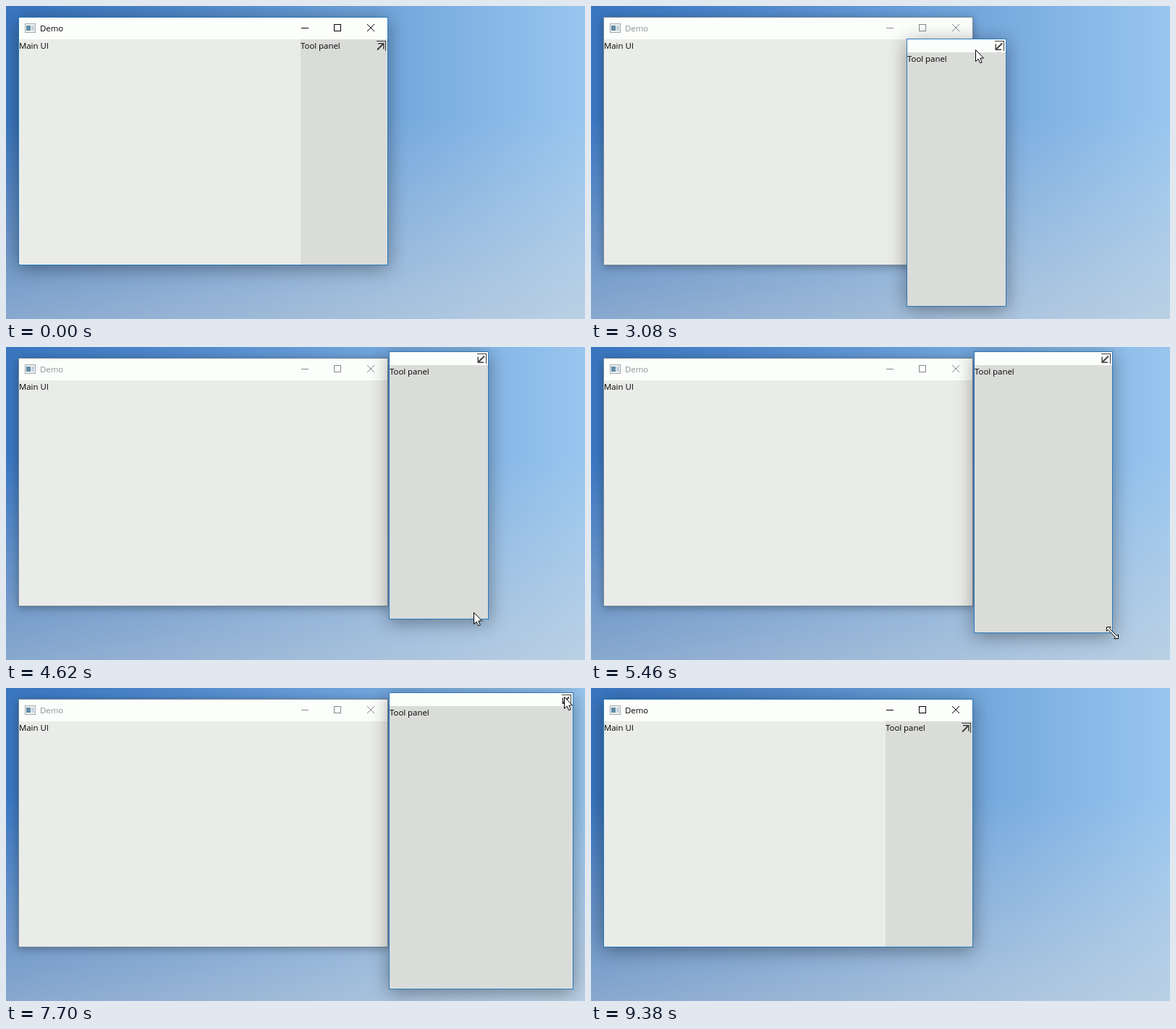
Recreate the animation shown at these times as an HTML page with a canvas. Size 800 px wide and 432 px high, loop 9.66 s.

```html
<!DOCTYPE html>
<html lang="en">
<head>
<meta charset="utf-8">
<title>Demo</title>
<style>
html, body { margin: 0; width: 100%; height: 100%; overflow: hidden; }
canvas { display: block; }
</style>
</head>
<body>
<canvas id="stage" width="800" height="432"></canvas>
<script>
const W = 800, H = 432, LOOP = 9660, STEP = 140;
const OPEN = 2380, DOCK = 7840;
const FONT = '11.4px "Open Sans", "Noto Sans", sans-serif';
const ctx = document.getElementById('stage').getContext('2d');

const mix = (a, b, u) => a + (b - a) * u;
const blend = (a, b, u) => `rgb(${a.map((v, i) => mix(v, b[i], u))})`;

// Blue from left to right, fading to a pale haze towards the bottom.
function makeSky() {
  const c = document.createElement('canvas');
  c.width = W;
  c.height = H;
  const g = c.getContext('2d');
  for (let x = 0; x < W; x++) {
    const u = x / W, top = blend([58, 118, 192], [152, 198, 239], u ** 1.2);
    const fade = g.createLinearGradient(0, 0, 0, H);
    fade.addColorStop(0, top);
    fade.addColorStop(0.35, top);
    fade.addColorStop(1, blend([136, 168, 206], [186, 208, 228], u));
    g.fillStyle = fade;
    g.fillRect(x, 0, 1, H);
  }
  return c;
}
const sky = makeSky();

// Keys are [time, x, y]; moves between them ease in and out.
function track(keys, t) {
  let i = keys.findIndex(k => t <= k[0]);
  if (i < 0) i = keys.length - 1;
  const b = keys[i], a = keys[Math.max(0, i - 1)];
  const u = a === b ? 1 : Math.min(1, (t - a[0]) / (b[0] - a[0]));
  const e = u * u * (3 - 2 * u);
  return [1, 2].map(k => Math.round(mix(a[k], b[k], e)));
}

const TOOL_POS = [[3080, 436, 45], [3360, 544, 12], [3640, 529, 6]];
const TOOL_SIZE = [[4900, 138, 370], [6020, 245, 407], [6300, 255, 410]];
const TO_BUTTON = [[1260, 500, 220], [1820, 524, 83], [2240, 516, 54], [3080, 531, 60]];
const TO_CORNER = [[3780, 624, 21], [4620, 646, 366], [4900, 665, 375]];
const TO_DOCK = [[6440, 783, 415], [7560, 771, 12], [7980, 771, 12], [8820, 510, 190]];

function rect(color, x, y, w, h) {
  ctx.fillStyle = color;
  ctx.fillRect(x, y, w, h);
}

function text(str, x, y, color = '#000') {
  ctx.font = FONT;
  ctx.fillStyle = color;
  ctx.fillText(str, x, y);
}

function lines(color, width, ...paths) {
  ctx.strokeStyle = color;
  ctx.lineWidth = width;
  ctx.beginPath();
  for (const p of paths) {
    ctx.moveTo(p[0], p[1]);
    for (let i = 2; i < p.length; i += 2) ctx.lineTo(p[i], p[i + 1]);
  }
  ctx.stroke();
}

function frame(x, y, w, h, border, blur, alpha) {
  ctx.save();
  ctx.shadowColor = `rgba(0,0,0,${alpha})`;
  ctx.shadowBlur = blur;
  ctx.shadowOffsetY = blur / 6;
  rect(border, x, y, w, h);
  ctx.restore();
  rect('#fcfefb', x + 1, y + 1, w - 2, h - 2);
}

// The arrow points up and out, or turned around, down and in.
function popIcon(x, y, out) {
  const c = '#3a3a3a';
  rect(c, x, y, 13, 1);
  rect(c, x + 12, y, 1, 14);
  ctx.save();
  ctx.translate(x + 5.5, y + 8);
  if (!out) ctx.rotate(Math.PI);
  lines(c, 1.8, [-4.5, 4.5, 4, -4]);
  lines(c, 1.4, [-3.5, -4.3, 4.3, -4.3, 4.3, 3.5]);
  ctx.restore();
}

function appIcon() {
  rect('#a3a9ac', 26, 24, 15, 13);
  rect('#f0f3f2', 27, 25, 13, 11);
  rect('#5f8ba5', 28, 27, 6, 7);
  rect('#c5d3df', 35, 27, 4, 7);
}

function mainWindow(active) {
  const ink = active ? '#000' : '#858a88';
  if (active) frame(17, 15, 511, 343, '#2478b8', 24, 0.38);
  else frame(17, 15, 511, 343, '#71889a', 12, 0.32);
  appIcon();
  text('Demo', 47, 35, active ? '#000' : '#8b9297');
  rect(ink, 408, 30, 10, 1);
  ctx.strokeStyle = ink;
  ctx.lineWidth = 1;
  ctx.strokeRect(453.5, 25.5, 9, 9);
  lines(ink, 1, [499, 25, 509, 35], [509, 25, 499, 35]);
  rect('#eaece9', 18, 46, 509, 311);
  text('Main UI', 18, 59);
  if (active) {
    rect('#dadcd9', 407, 46, 120, 311);
    text('Tool panel', 407, 59);
    popIcon(512, 48, true);
  }
}

function toolWindow(x, y, w, h) {
  frame(x, y, w, h, '#2a79be', 24, 0.38);
  rect('#dadcd9', x + 1, y + 19, w - 2, h - 20);
  text('Tool panel', x + 1, y + 32);
  popIcon(x + w - 16, y + 3, false);
}

function outline(pts, x, y) {
  ctx.beginPath();
  for (let i = 0; i < pts.length; i += 2) ctx.lineTo(x + pts[i] + 0.5, y + pts[i + 1] + 0.5);
  ctx.closePath();
  ctx.fillStyle = '#fff';
  ctx.strokeStyle = '#000';
  ctx.lineWidth = 1;
  ctx.fill();
  ctx.stroke();
}

function arrow(x, y) {
  outline([0, 0, 0, 16, 3.6, 12.6, 6.2, 18.2, 8.7, 17.2, 6.3, 11.6, 11, 11.4], x, y);
}

function resizeArrow(x, y) {
  const side = [-8, -2.5, -8, -8, -2.5, -8, -4.2, -6, 6, 4.2];
  outline(side.concat(side.map(v => -v)), x, y);
}

function draw(t) {
  const open = t >= OPEN && t < DOCK;
  const [x, y] = track(TOOL_POS, t), [w, h] = track(TOOL_SIZE, t);
  ctx.drawImage(sky, 0, 0);
  mainWindow(!open);
  if (open) toolWindow(x, y, w, h);

  if (t < 1260 || t >= 9100) return;
  if (t < 3080) arrow(...track(TO_BUTTON, t));
  else if (t < 3780) arrow(x + 95, y + 15);
  else if (t < 4900) arrow(...track(TO_CORNER, t));
  else if (t < 6440) resizeArrow(x + w - 1, y + h - 1);
  else arrow(...track(TO_DOCK, t));
}

const start = performance.now();
function tick() {
  const t = (performance.now() - start) % LOOP;
  draw(Math.floor(t / STEP) * STEP);
  requestAnimationFrame(tick);
}
tick();
</script>
</body>
</html>
```
